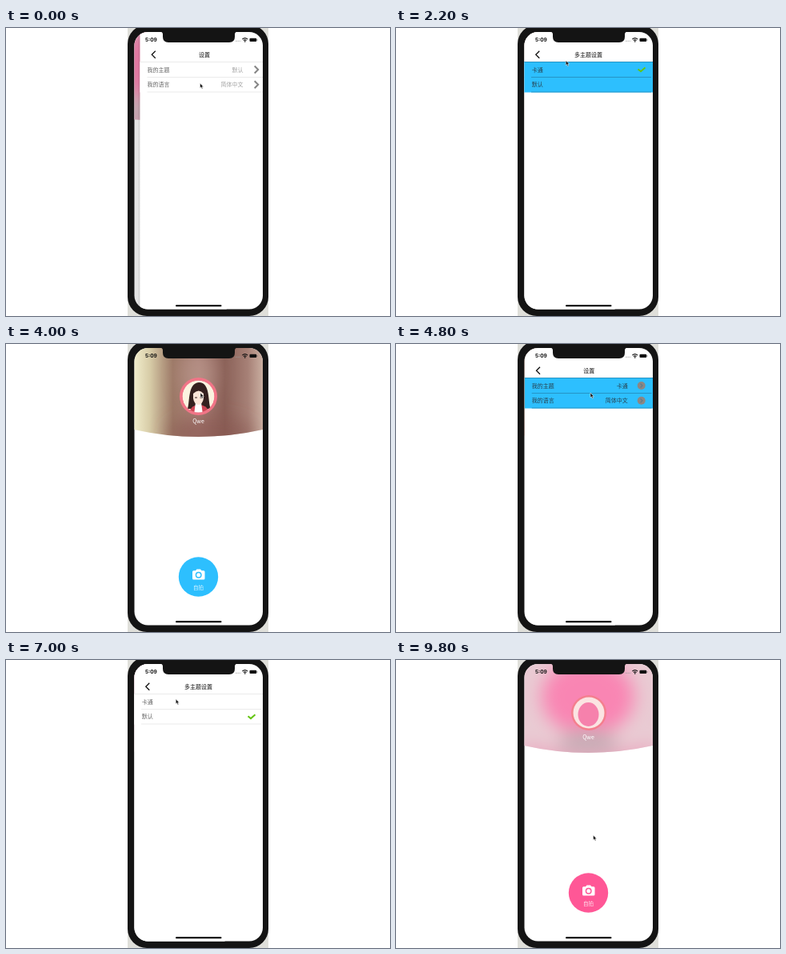
An HTML page that plays this animation: 480 by 360 pixels, repeating every 10 s.

```html
<!DOCTYPE html>
<html lang="zh-CN">
<head>
<meta charset="utf-8">
<title>主题切换</title>
<style>
  html, body { margin: 0; width: 100%; height: 100%; overflow: hidden; background: #fff; }
  svg { display: block; width: 100vw; height: 100vh; }
  text { font: 7px "Noto Sans CJK SC", "Noto Sans CJK", "Noto Sans", sans-serif; }
  svg { --accent: #ff5796; --row: #fff; --label: #666; --value: #a3a3a3; --line: #e6e6e6; }
  svg.cartoon { --accent: #2dbffe; --row: #2dbffe; --label: #28424f; --value: #28424f; --line: #258ab5; }
  .cartoon .plain-only, svg:not(.cartoon) .cartoon-only { display: none; }
  .accent { fill: var(--accent); }
  .row { fill: var(--row); }
  .label { fill: var(--label); }
  .value { fill: var(--value); text-anchor: end; }
  .line { stroke: var(--line); stroke-width: .8; }
  .title { font-weight: 500; text-anchor: middle; fill: #111; }
  .stroke { fill: none; stroke: #111; stroke-width: 1.3; }
</style>
</head>
<body>
<svg id="stage" viewBox="0 0 480 360">
  <defs>
    <clipPath id="screen"><rect x="160.5" y="5" width="160.5" height="346.5" rx="17"/></clipPath>
    <clipPath id="banner"><path d="M160 0H321.500V107Q240.500 125 160 107Z"/></clipPath>
    <clipPath id="portrait"><circle cx="240.500" cy="65.500" r="20"/></clipPath>
    <filter id="blur" x="-50%" y="-50%" width="200%" height="200%"><feGaussianBlur stdDeviation="11"/></filter>
    <linearGradient id="brown">
      <stop offset="0" stop-color="#f1edcc"/><stop offset=".12" stop-color="#d8cda8"/>
      <stop offset=".3" stop-color="#9c7866"/><stop offset=".5" stop-color="#a97d75"/>
      <stop offset=".7" stop-color="#8a6057"/><stop offset=".88" stop-color="#a78177"/>
      <stop offset="1" stop-color="#cbb0a2"/>
    </linearGradient>
    <linearGradient id="edge">
      <stop offset="0" stop-color="#000" stop-opacity="0"/><stop offset="1" stop-color="#000" stop-opacity=".1"/>
    </linearGradient>

    <g id="header">
      <rect x="160" y="0" width="161.500" height="360" fill="#fff"/>
      <path class="stroke" d="M179.300 28.700L174.800 33.200L179.300 37.700"/>
    </g>
    <g id="rows">
      <rect class="row" x="160" y="42" width="161.500" height="38.500"/>
      <path class="line" d="M160 42.500H321.500M169 61.500H319M169 80H319"/>
    </g>
    <g id="chevron">
      <path class="plain-only" d="M303.200 -4.500L307.700 0L303.200 4.500" fill="none" stroke="#858585" stroke-width="2"/>
      <g class="cartoon-only">
        <circle cx="306" r="5" fill="#8c8784"/>
        <path d="M304.800 -2.500L307.300 0L304.800 2.500" fill="none" stroke="#5f7c8b" stroke-width="1.200"/>
      </g>
    </g>
  </defs>

  <rect x="152" width="176" height="360" fill="#dfdfda"/>
  <rect x="152" y="-4" width="176" height="364" rx="24" fill="#141414"/>

  <g clip-path="url(#screen)">
    <g id="home">
      <rect x="160" width="161.500" height="360" fill="#fff"/>
      <g clip-path="url(#banner)">
        <g class="plain-only">
          <rect x="160" width="162" height="120" fill="#e9cbd3"/>
          <g filter="url(#blur)">
            <ellipse cx="240" cy="46" rx="58" ry="48" fill="#f985b3"/>
            <ellipse cx="240" cy="104" rx="36" ry="17" fill="#c3b1b7"/>
            <path d="M158 105Q240 127 323 105V135H158Z" fill="#eaa6be"/>
          </g>
        </g>
        <g class="cartoon-only">
          <rect x="160" width="162" height="120" fill="url(#brown)"/>
          <g filter="url(#blur)">
            <ellipse cx="256" cy="112" rx="55" ry="20" fill="#87584f" opacity=".6"/>
            <ellipse cx="240" cy="38" rx="22" ry="30" fill="#bb9b90" opacity=".6"/>
          </g>
        </g>
      </g>
      <g class="plain-only">
        <circle cx="241" cy="66" r="22" fill="#f47f8e"/>
        <circle cx="241" cy="66" r="19.500" fill="#fbe4e2"/>
        <ellipse cx="240.500" cy="68" rx="13" ry="15" fill="#f681ac"/>
      </g>
      <g class="cartoon-only">
        <circle cx="240.500" cy="65.500" r="23.500" fill="#f17587"/>
        <g clip-path="url(#portrait)">
          <circle cx="240.500" cy="65.500" r="20" fill="#fbf3df"/>
          <path d="M227 81C230 73 227 49 241 48C256 48 252 73 256 81Z" fill="#35211f"/>
          <path d="M229 88Q230 76 241 76Q253 76 254 88Z" fill="#ce4554"/>
          <path d="M237 73H244L246 88H235Z" fill="#fff"/>
          <path d="M234 62Q241 55 247 62V68Q246 75 240.500 76Q235 75 234 68Z" fill="#fce6d8"/>
          <path d="M236 67H239M242.500 67H245.500" stroke="#35211f"/>
        </g>
      </g>
      <text x="240.500" y="98.500" text-anchor="middle" fill="#fff">Qwe</text>
      <circle class="accent" cx="240.500" cy="291" r="24.700"/>
      <path d="M234.500 283.200H237L238.500 281.400H243L244.500 283.200H247Q248.500 283.200 248.500 284.700V293Q248.500 294.500 247 294.500H234.500Q233 294.500 233 293V284.700Q233 283.200 234.500 283.200Z" fill="#fff"/>
      <circle class="accent" cx="240.700" cy="288.700" r="4"/>
      <circle cx="240.700" cy="288.700" r="2.500" fill="#fff"/>
      <text x="240.500" y="307.200" text-anchor="middle" fill="#fff" opacity=".85" style="font-size:6.500px">自拍</text>
      <rect class="dim" x="160" width="162" height="360"/>
    </g>

    <g id="settings">
      <rect x="157" width="3" height="360" fill="url(#edge)"/>
      <use href="#header"/><use href="#rows"/>
      <text class="title" x="240.500" y="35.700">设置</text>
      <text class="label" x="169" y="54.500">我的主题</text>
      <text class="value" x="289" y="54.500" id="themeName"></text>
      <use href="#chevron" y="52"/>
      <text class="label" x="169" y="73.300">我的语言</text>
      <text class="value" x="289" y="73.300">简体中文</text>
      <use href="#chevron" y="70.800"/>
      <rect class="dim" x="160" width="162" height="360"/>
    </g>

    <g id="themes">
      <rect x="157" width="3" height="360" fill="url(#edge)"/>
      <use href="#header"/><use href="#rows"/>
      <text class="title" x="240.500" y="35.700">多主题设置</text>
      <text class="label" x="169.700" y="54.500">卡通</text>
      <text class="label" x="169.700" y="73.300">默认</text>
      <path id="check" d="M302.500 -.5L306 2.300L311.500 -2.500" fill="none" stroke="#65c514" stroke-width="2"/>
    </g>
  </g>

  <path d="M193 4.500Q196 5 196 8V11Q196 18 203 18H279Q286 18 286 11V8Q286 5 289 4.500Z" fill="#141414"/>
  <text x="174" y="17.300" fill="#111" style="font:700 6.500px Inter,sans-serif">5:09</text>
  <path d="M286.500 16.300H293.500" stroke="#999" stroke-width=".9" stroke-dasharray=".9 .7"/>
  <g fill="none" stroke="#111" stroke-width="1.100">
    <path d="M295.400 14Q298.700 11.200 302 14M296.900 15.600Q298.700 14.100 300.500 15.600"/>
    <circle cx="298.700" cy="16.800" r=".3"/>
  </g>
  <rect x="304.500" y="12.800" width="8.700" height="4.300" rx="1.100" fill="#111"/>
  <rect x="313.600" y="14.100" width=".7" height="1.700" fill="#555"/>
  <rect x="212" y="346" width="57.500" height="2.300" rx="1.150" fill="#111"/>
  <path id="cursor" d="M0 0V6L1.400 4.800L2.400 7.100L3.500 6.600L2.500 4.400H4.300Z" fill="#111" stroke="#fff" stroke-width=".5"/>
</svg>
<script>
const LOOP = 10000, STEP = 200, SLIDE = 500, WIDTH = 160.5, PARALLAX = 48;
const el = id => document.getElementById(id);
const clamp = v => Math.max(0, Math.min(1, v));

// Page depth: 0 home, 1 settings, 2 theme list.
const navigation = [[-247, 1], [650, 2], [2512, 1], [3150, 0], [4450, 1], [5720, 2], [7330, 1], [8180, 0]];
const cartoonFrom = 1750, cartoonUntil = 6650;
const pointer = [
  [0, 242.5, 69], [500, 256, 50], [800, 257, 50], [1200, 260.5, 61.5], [1650, 252, 50], [1900, 252, 50],
  [2450, 182, 33.5], [3200, 182, 33.5], [3850, 243, 61], [4800, 243, 61], [5600, 250, 55.5], [5900, 250, 54],
  [6500, 252, 69], [6700, 252, 69], [7250, 182, 33.5], [8100, 182, 33.5], [8400, 187, 49.5], [9300, 246.5, 219], [LOOP, 246.5, 219]
];

function depthAt(time) {
  let depth = 0;
  for (const [start, target] of navigation) {
    const remaining = 1 - clamp((time - start) / SLIDE);
    depth += (target - depth) * (1 - remaining ** 4.5);
  }
  return depth;
}

function pointerAt(time) {
  const next = pointer.findIndex(([at]) => at > time);
  const [t0, x0, y0] = pointer[next - 1], [t1, x1, y1] = pointer[next];
  const u = (time - t0) / (t1 - t0), k = u * u * (3 - 2 * u);
  return [x0 + (x1 - x0) * k, y0 + (y1 - y0) * k];
}

function placePage(id, level, depth) {
  const page = el(id), covered = clamp(depth - level);
  const x = WIDTH * (1 - clamp(depth - level + 1)) - PARALLAX * covered;
  page.setAttribute('transform', `translate(${x})`);
  page.setAttribute('visibility', depth > level - 1 || level === 0 ? 'visible' : 'hidden');
  page.querySelector('.dim')?.setAttribute('opacity', 0.11 * covered);
}

function draw(now) {
  const time = Math.floor((now % LOOP) / STEP) * STEP;
  const cartoon = time >= cartoonFrom && time < cartoonUntil;
  const depth = depthAt(time);
  el('stage').classList.toggle('cartoon', cartoon);
  el('themeName').textContent = cartoon ? '卡通' : '默认';
  el('check').setAttribute('transform', `translate(0 ${cartoon ? 52 : 70.8})`);
  ['home', 'settings', 'themes'].forEach((id, level) => placePage(id, level, depth));
  el('cursor').setAttribute('transform', `translate(${pointerAt(time)})`);
}

const begin = performance.now();
function tick() {
  draw(performance.now() - begin);
  requestAnimationFrame(tick);
}
tick();
</script>
</body>
</html>
```
